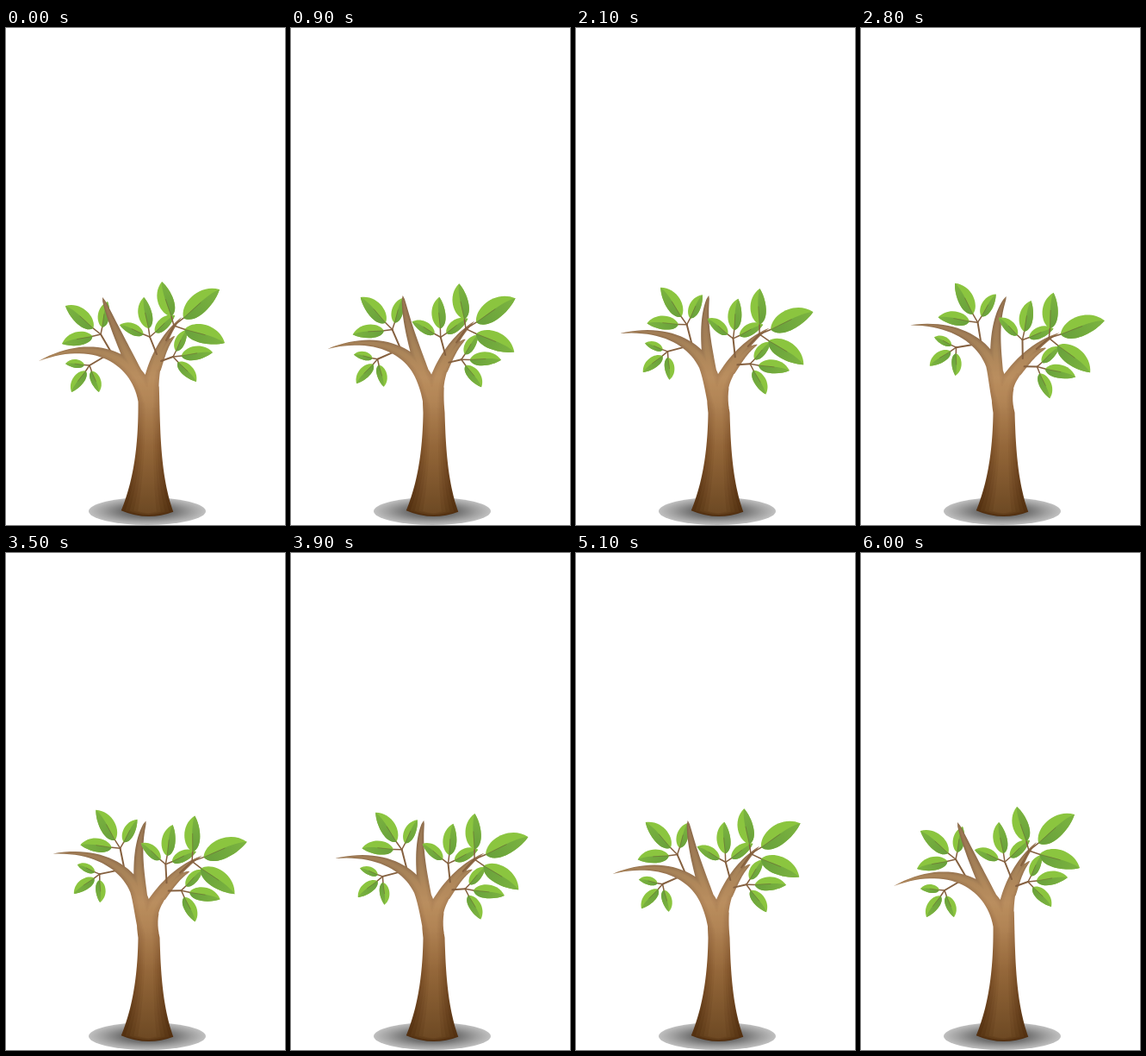
An HTML page with a canvas that plays this animation: 324 by 576 pixels, repeating every 6100 ms.

```html
<!DOCTYPE html>
<html lang="en">
<head>
<meta charset="utf-8">
<title>Swaying tree</title>
<style>
  html, body { margin: 0; width: 100%; height: 100%; overflow: hidden; background: #fff; }
  canvas { display: block; }
</style>
</head>
<body>
<canvas id="stage" width="324" height="576"></canvas>
<script>
const ctx = document.getElementById('stage').getContext('2d');
const STEP = 100, STEPS = 61, HALF = 30;
const SWAY = 22.5 * Math.PI / 180;
const LEFT = [160, 417], RIGHT = [168, 415];

// Each limb is a cubic centre line with a half width along it
const taper = (half, power) => t => half * (1 - t) ** power;
const limbs = [
  { pivot: RIGHT, curve: [[164, 560], [165, 520], [167, 470], [165.5, 416]],
    half: t => 12.3 + 18 * (1 - t) ** 2.6 },
  { pivot: LEFT, curve: [[166, 440], [158, 385], [105, 355], [38, 386]], half: taper(11.5, 0.85) },
  { pivot: LEFT, curve: [[164, 432], [150, 395], [130, 360], [112, 312]], half: taper(9, 0.5),
    flex: [17, 10] },
  { pivot: RIGHT, curve: [[167, 440], [166, 400], [178, 362], [204, 335]], half: taper(11.5, 0.85) },
  { pivot: RIGHT, curve: [[174, 395], [180, 380], [185, 366], [196, 357]], half: taper(6, 0.6) }
];

// Each sprig forks at its hub into three leaves
const leftSprigs = [
  { root: [124, 379], hub: [110, 355], tips: [[65, 366], [69, 322], [118, 317]] },
  { root: [114, 381], hub: [97, 391], tips: [[69, 389], [76, 422], [108, 422]] }
];
const rightSprigs = [
  { root: [175, 378], hub: [167, 358], tips: [[132, 344], [160, 312], [196, 333]] },
  { root: [180, 386], hub: [194, 381], tips: [[210, 350], [240, 376], [221, 410]] },
  { root: [186, 362], hub: [195, 345], tips: [[181, 294], [248, 303], [254, 365]] }
];

const mix = (p, q, t) => [p[0] + (q[0] - p[0]) * t, p[1] + (q[1] - p[1]) * t];

function gradient(g, ...colors) {
  colors.forEach(([at, color]) => g.addColorStop(at, color));
  return g;
}

const woodFill = gradient(ctx.createLinearGradient(0, 310, 0, 566),
  [0, '#836346'], [0.2, '#92704d'], [0.37, '#ad8257'], [0.48, '#a2754a'],
  [0.68, '#80532a'], [1, '#4f2d0e']);
const shadowFill = gradient(ctx.createRadialGradient(0, 0, 0, 0, 0, 68),
  [0, '#484848'], [0.45, '#747474'], [0.75, '#a0a0a0'], [1, '#c0c0c0']);

// Turns a point about its pivot, fading to none down the trunk
function bend([x, y], [px, py], sway) {
  const angle = SWAY * sway * Math.max(0, Math.min(1, (445 - y) / 45));
  const c = Math.cos(angle), s = Math.sin(angle), dx = x - px, dy = y - py;
  return [px + dx * c - dy * s, py + dx * s + dy * c];
}

function addLimb(path, { pivot, curve: [a, b, c, d], half, flex = [0, 0] }, sway, scale) {
  const sides = [[], []];
  for (let i = 0; i <= 32; i++) {
    const t = i / 32;
    const p = mix(mix(a, b, t), mix(b, c, t), t), q = mix(mix(b, c, t), mix(c, d, t), t);
    const [x, y] = mix(p, q, t);
    const reach = half(t) * scale / Math.hypot(q[0] - p[0], q[1] - p[1]);
    const nx = (q[1] - p[1]) * reach, ny = (p[0] - q[0]) * reach;
    const pull = sway * t ** 4;
    sides.forEach((side, k) => {
      const sign = k ? -1 : 1;
      const [bx, by] = bend([x + nx * sign, y + ny * sign], pivot, sway);
      side.push([bx + flex[0] * pull, by + flex[1] * pull]);
    });
  }
  const [near, far] = sides;
  path.moveTo(...near[0]);
  [...near, ...far.reverse()].forEach(p => path.lineTo(...p));
  path.quadraticCurveTo(a[0], a[1] + half(0) * scale * 0.4, ...near[0]);
}

// Narrower, lighter layers round the wood off towards its middle
function drawWood(sway) {
  for (let scale = 1; scale > 0.3; scale -= 0.16) {
    const path = new Path2D();
    limbs.forEach(limb => addLimb(path, limb, sway, scale));
    ctx.fillStyle = scale === 1 ? woodFill : 'rgba(255, 205, 140, 0.045)';
    ctx.fill(path);
  }
}

function drawShadow() {
  ctx.save();
  ctx.translate(164, 560);
  ctx.scale(1, 16 / 68);
  ctx.fillStyle = shadowFill;
  ctx.beginPath();
  ctx.arc(0, 0, 68, 0, Math.PI * 2);
  ctx.fill();
  ctx.restore();
}

function drawLine(from, to, width, color) {
  ctx.strokeStyle = color;
  ctx.lineWidth = width;
  ctx.beginPath();
  ctx.moveTo(...from);
  ctx.lineTo(...to);
  ctx.stroke();
}

function drawLeaf([x, y], [tipX, tipY]) {
  const dx = tipX - x, dy = tipY - y, len = Math.hypot(dx, dy);
  const shaded = dx / len > -0.45 ? 1 : -1;
  const half = len * 0.29, curl = -shaded * len * 0.1;
  const blade = (from, to) => {
    ctx.beginPath();
    ctx.moveTo(0, 0);
    ctx.bezierCurveTo(len * 0.12, from, len * 0.72, from + curl, len, 0);
    ctx.bezierCurveTo(len * 0.72, to + curl, len * 0.12, to, 0, 0);
    ctx.fill();
  };
  ctx.save();
  ctx.translate(x, y);
  ctx.rotate(Math.atan2(dy, dx));
  ctx.fillStyle = '#8bc53f';
  blade(-half, half);
  ctx.fillStyle = gradient(ctx.createLinearGradient(0, 0, len, 0),
    [0, '#68a03b'], [1, '#7cb440']);
  blade(0, half * shaded);
  drawLine([0, 0], [len * 0.5, curl * 0.3], 0.7, 'rgba(110, 85, 50, 0.6)');
  ctx.restore();
}

function drawSprigs(sprigs, [px, py], sway) {
  ctx.save();
  ctx.translate(px, py);
  ctx.rotate(SWAY * sway);
  ctx.translate(-px, -py);
  for (const { root, hub, tips } of sprigs) {
    drawLine(root, hub, 2, '#85603f');
    for (const tip of tips) {
      const base = mix(hub, tip, 0.21);
      drawLine(hub, base, 1.5, '#85603f');
      drawLeaf(base, tip);
    }
  }
  ctx.restore();
}

function draw(now) {
  const step = Math.floor(now / STEP) % STEPS;
  const sway = 1 - Math.abs(step - HALF) / HALF;
  ctx.fillStyle = '#fff';
  ctx.fillRect(0, 0, 324, 576);
  drawShadow();
  drawSprigs(leftSprigs, LEFT, sway);
  drawWood(sway);
  drawSprigs(rightSprigs, RIGHT, sway);
}

const start = performance.now();
function tick() {
  draw(performance.now() - start);
  requestAnimationFrame(tick);
}
ctx.lineCap = 'round';
tick();
</script>
</body>
</html>
```
